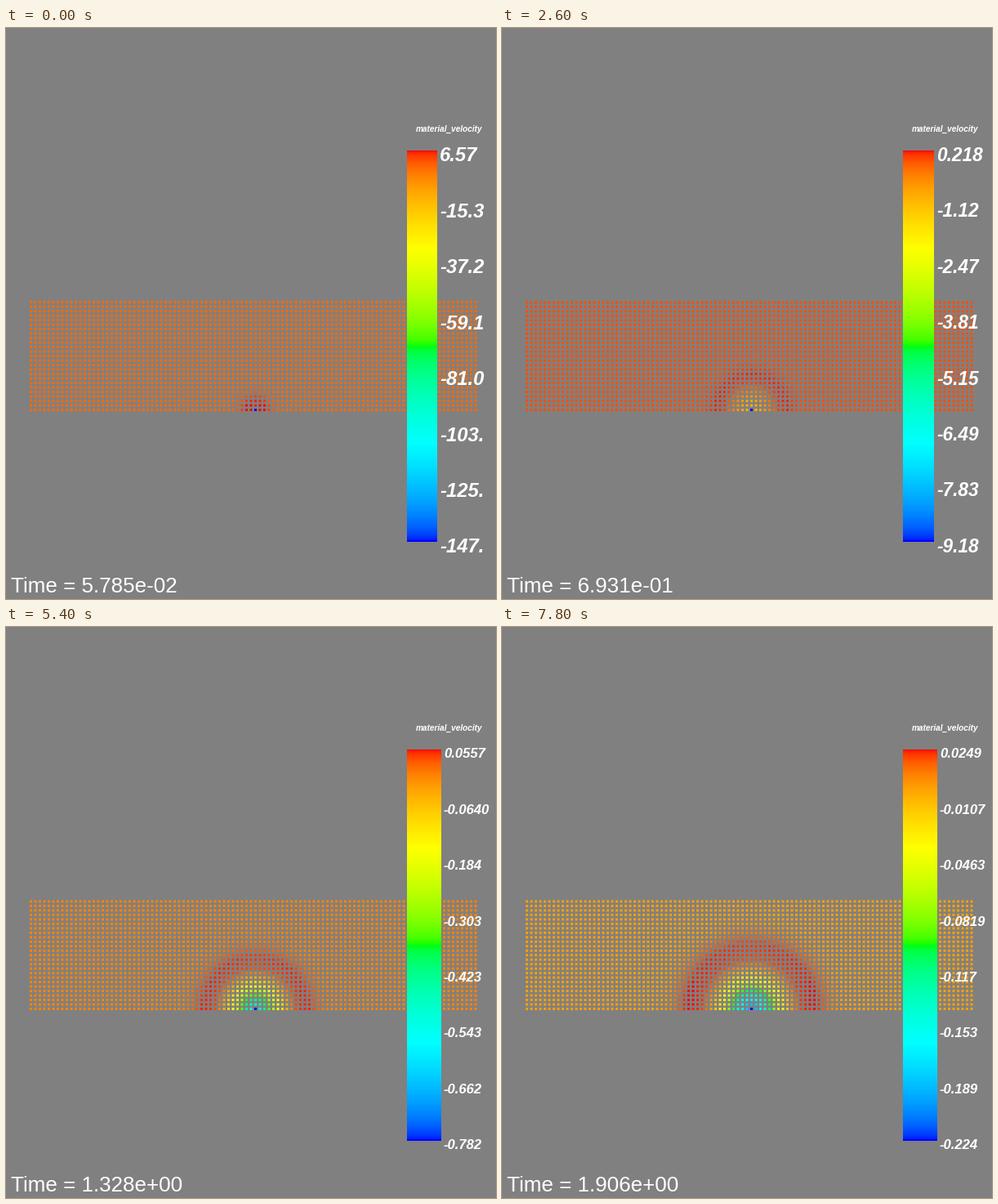
Animation of 600x699 px, one loop 8000 ms. Source, as a matplotlib script:

```python
import numpy as np
import matplotlib.pyplot as plt
from matplotlib.animation import FuncAnimation
from matplotlib.colors import hsv_to_rgb

W, H, DPI = 600, 699, 100
GRAY = 128
COLS, ROWS, PITCH, DOT = 100, 25, 5.5, 3
SOURCE_X, SOURCE_Y, MID = 305.5, 467.5, 50
BAR_X, BAR_TOP, BAR_BOTTOM = 491, 150, 629

# Regular output steps, plus an extra one at every quarter second
TIMES = sorted([0.05775 * n + 9.95e-5 for n in range(1, 34)]
               + [0.25 * n for n in range(1, 8)])


def make_lut(n=256):
    hue = np.linspace(2 / 3, 0, n)
    hsv = np.stack([hue, np.ones(n), np.ones(n)], axis=1)
    return np.round(255 * np.sqrt(hsv_to_rgb(hsv)))


def gauss(x):
    return np.exp(-x * x)


def value_range(t):
    """Both ends of the legend die away as the wave spreads."""
    top = (0.2522 + 2.3494 * t + 0.6008 * t**2 - 0.0831 * t**3) ** -2
    low = -188.85 * np.exp(-4.375 * t) - 0.231 * gauss((t - 1.52) / 0.765)
    return low, top


LUT = make_lut()
col, row = np.meshgrid(np.arange(COLS), np.arange(ROWS))
radius = np.hypot(col - MID, row)
sideways = np.abs(col - MID) / np.maximum(radius, 1)


def dot_colors(t, low, top):
    ring_radius = 8.8 * t**0.6
    ring_width = 1 + 1.65 * t + 1.5 * np.exp(-10 * t)
    ring = np.minimum(1, 1.2 * gauss((radius - ring_radius) / ring_width))
    ring *= 0.88 + 0.12 * sideways
    core = 0.84 / (1 + (1.073 / t) ** 4.5) * gauss(radius / (3.6 + 0.9 * t))
    depth = top / (top - low) * (1 - ring) + core
    depth[0, MID] = 1
    return LUT[np.clip(np.round(255 * (1 - depth)), 0, 255).astype(int)]


def coverage(center):
    """First pixel of each dot and how much of each pixel it fills."""
    start = center - DOT / 2
    first = np.floor(start).astype(int)
    part = start - first
    return first, [1 - part, *[np.ones_like(part)] * (DOT - 1), part]


def draw_stage(t, low, top, bar_w):
    img = np.full((H, W, 3), GRAY, np.uint8)
    ink = dot_colors(t, low, top) - GRAY
    settle = 0.5 * row / (ROWS - 1) * (1 - np.exp(-4 * t))
    x, x_fill = coverage(SOURCE_X + PITCH * (col - MID))
    y, y_fill = coverage(SOURCE_Y - PITCH * row + settle)
    for dy, fy in enumerate(y_fill):
        for dx, fx in enumerate(x_fill):
            img[y + dy, x + dx] = GRAY + ink * (fx * fy)[..., None]
    height = BAR_BOTTOM - BAR_TOP
    ramp = LUT[np.arange(height)[::-1] * len(LUT) // height]
    img[BAR_TOP:BAR_BOTTOM, BAR_X:BAR_X + bar_w] = ramp[:, None]
    return img


def text_ems(s):
    return sum({".": 0.278, "-": 0.333}.get(c, 0.556) for c in s)


fig = plt.figure(figsize=(W / DPI, H / DPI), dpi=DPI, facecolor="#808080")
ax = fig.add_axes([0, 0, 1, 1])
ax.axis("off")
picture = ax.imshow(np.full((H, W, 3), GRAY, np.uint8), extent=(0, W, H, 0),
                    interpolation="nearest", aspect="auto")
ax.set_xlim(0, W)
ax.set_ylim(H, 0)


def write(x, y, s, px, **style):
    return ax.text(x, y, s, fontsize=px * 72 / DPI, color="white",
                   family="Liberation Sans", va="baseline", **style)


BOLD = dict(weight="bold", style="italic")
write(542.5, 127, "material_velocity", 10, ha="center", **BOLD)
clock = write(6, 691, "", 26)
labels = [write(0, 0, "", 24, **BOLD) for _ in range(8)]


def update(i):
    t = TIMES[i]
    low, top = value_range(t)
    texts = ["%#.3g" % v for v in np.linspace(top, low, len(labels))]
    px = min(23.9, 56.5 / max(map(text_ems, texts)))
    bar_w = int(round(37 + (23.9 - px) * 0.65))
    picture.set_data(draw_stage(t, low, top, bar_w))
    for k, (label, s) in enumerate(zip(labels, texts)):
        middle = 153 + 0.085 * px + k * (BAR_BOTTOM - BAR_TOP) / 7
        label.set_text(s)
        label.set_fontsize(px * 72 / DPI)
        label.set_position((BAR_X + bar_w + 3, middle + 0.35 * px))
    clock.set_text(f"Time = {t:.3e}")
    return [picture, clock, *labels]


anim = FuncAnimation(fig, update, frames=len(TIMES), interval=200,
                     repeat=True, repeat_delay=0, init_func=lambda: update(0))
plt.show()
```
